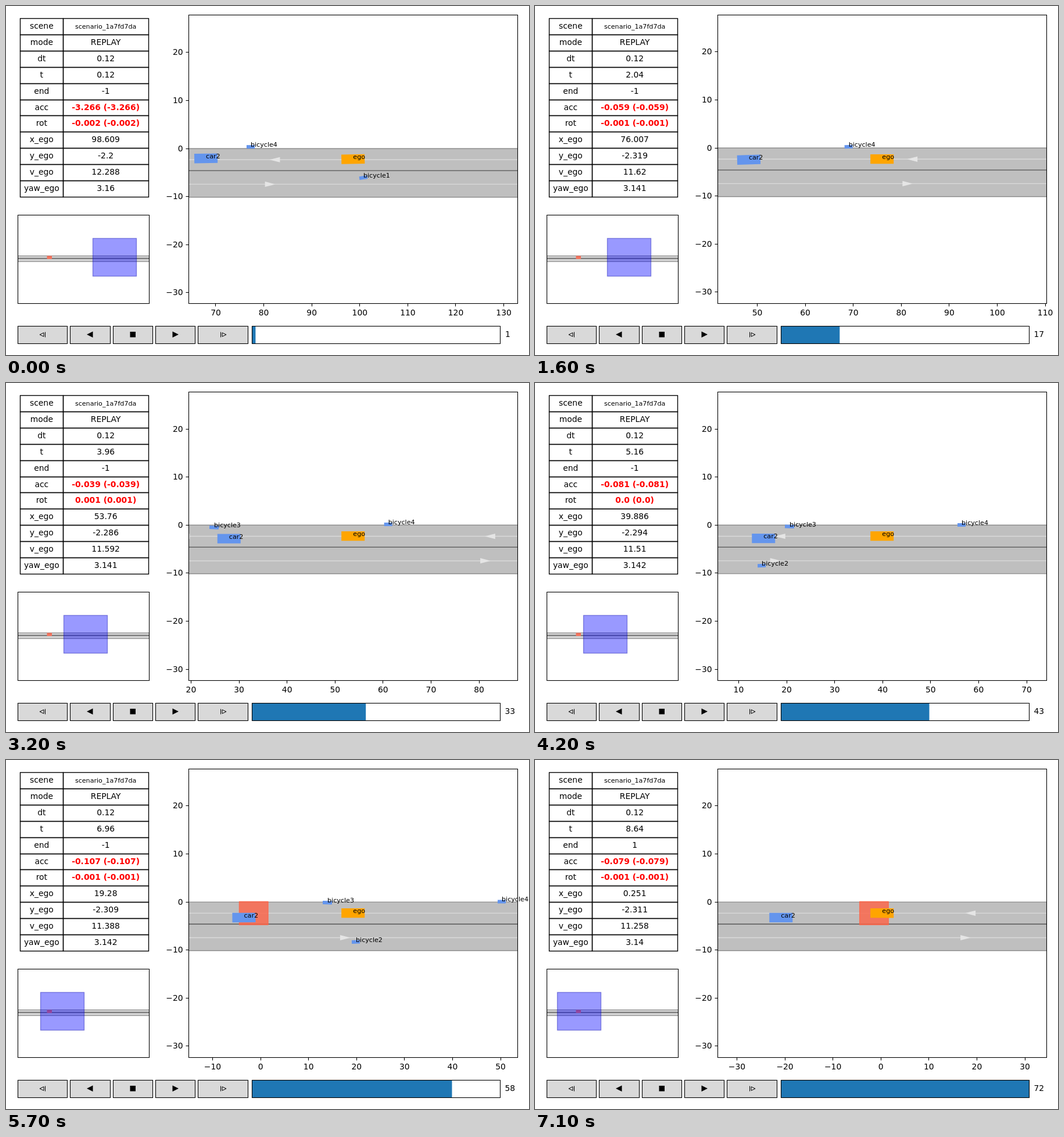
These frames come from a looping animation (900x600 px, 7200 ms). An HTML page with a canvas:

```html
<!DOCTYPE html>
<html lang="en">
<head>
<meta charset="utf-8">
<title>Driving replay</title>
<style>
html, body { margin: 0; width: 100%; height: 100%; overflow: hidden; background: #fff; }
canvas { display: block; }
</style>
</head>
<body>
<canvas id="stage" width="900" height="600"></canvas>
<script>
const ctx = document.getElementById('stage').getContext('2d');
const LOOP = 7200, STEP = 100;
const FONT = '"DejaVu Sans", sans-serif';
const VIEW = { left: 314.5, top: 15.5, right: 880.5, bottom: 511.5, cx: 597.3, cy: 263.2, scale: 8.26 };
const MARKS = [1, 10, 24, 33, 43, 58, 72];

// Monotone cubic through (ns, vs), continued in a straight line at both ends.
function track(vs, ns = MARKS, startSlope) {
  const last = ns.length - 1;
  const secant = ns.slice(1).map((n, i) => (vs[i + 1] - vs[i]) / (n - ns[i]));
  const slope = ns.map((_, i) => {
    if (i === 0) return startSlope ?? secant[0];
    if (i === last) return secant[last - 1];
    const a = secant[i - 1], b = secant[i];
    return a * b <= 0 ? 0 : 2 * a * b / (a + b);
  });
  return n => {
    if (n <= ns[0]) return vs[0] + slope[0] * (n - ns[0]);
    if (n >= ns[last]) return vs[last] + slope[last] * (n - ns[last]);
    let i = 0;
    while (n > ns[i + 1]) i++;
    const h = ns[i + 1] - ns[i], u = (n - ns[i]) / h, w = 1 - u;
    return w * w * ((1 + 2 * u) * vs[i] + u * h * slope[i])
      + u * u * ((3 - 2 * u) * vs[i + 1] - w * h * slope[i + 1]);
  };
}

const ego = {
  x: track([98.609, 85.787, 66.284, 53.76, 39.886, 19.28, 0.251], MARKS, -1.47),
  y: track([-2.2, -2.335, -2.297, -2.286, -2.294, -2.309, -2.311]),
  yaw: track([3.16, 3.143, 3.14, 3.141, 3.142, 3.142, 3.14]),
  rot: track([-0.002, -0.003, 0.001, 0.001, 0, -0.001, -0.001]),
  acc: track([-0.155, -0.155, 0.037, -0.039, -0.081, -0.107, -0.079]),
  v: track([11.69, 11.664, 11.589, 11.592, 11.51, 11.388, 11.258])
};
// Initial braking, which fades within the first steps.
const braking = (n, amount, fade) => n < 10 ? amount * Math.exp((1 - n) / fade) : 0;

const others = [
  { name: 'car2', w: 40, h: 16.3, from: 1, to: 72,
    x: track([67.95, 56.82, 39.55, 27.91, 15.18, -3.46, -20.82]),
    y: track([-2.05, -2.22, -2.67, -2.83, -2.76, -3.25, -3.25]) },
  { name: 'bicycle1', w: 14, h: 6, from: 1, to: 5,
    x: track([100.75, 105.2], [1, 10]), y: track([-6.05, -5.35], [1, 10]) },
  { name: 'bicycle2', w: 14, h: 6, from: 34, to: 64,
    x: track([14.8, 19.85], [43, 58]), y: track([-8.44, -8.31], [43, 58]) },
  { name: 'bicycle3', w: 16, h: 6, from: 25, to: 64,
    x: track([24.79, 20.6, 13.92], [33, 43, 58]), y: track([-0.5, -0.3, -0.14], [33, 43, 58]) },
  { name: 'bicycle4', w: 14, h: 6, from: 1, to: 65,
    x: track([77.26, 72.67, 65.43, 61.07, 56.44, 50.24], MARKS.slice(0, 6)),
    y: track([0.35, 0.35, 0.15, 0.16, 0.04, 0.08], MARKS.slice(0, 6)) }
];

function text(str, x, y, { size = 13.89, align = 'center', color = '#000', weight = '' } = {}) {
  ctx.font = `${weight} ${size}px ${FONT}`;
  ctx.textAlign = align;
  ctx.fillStyle = color;
  ctx.fillText(str, x, y);
}

function line(x1, y1, x2, y2, color = '#000', width = 1.1) {
  ctx.strokeStyle = color;
  ctx.lineWidth = width;
  ctx.beginPath();
  ctx.moveTo(x1, y1);
  ctx.lineTo(x2, y2);
  ctx.stroke();
}

function box(x1, y1, x2, y2, fill, stroke = '#000', width = 1.1) {
  if (fill) {
    ctx.fillStyle = fill;
    ctx.fillRect(x1, y1, x2 - x1, y2 - y1);
  }
  if (stroke) {
    ctx.strokeStyle = stroke;
    ctx.lineWidth = width;
    ctx.strokeRect(x1, y1, x2 - x1, y2 - y1);
  }
}

function triangle(tipX, baseX, y, half, fill, stroke) {
  ctx.beginPath();
  ctx.moveTo(tipX, y);
  ctx.lineTo(baseX, y - half);
  ctx.lineTo(baseX, y + half);
  ctx.closePath();
  if (fill) {
    ctx.fillStyle = fill;
    ctx.fill();
  }
  if (stroke) {
    ctx.strokeStyle = stroke;
    ctx.lineWidth = 1;
    ctx.stroke();
  }
}

function clipped(x1, y1, x2, y2, draw) {
  ctx.save();
  ctx.beginPath();
  ctx.rect(x1, y1, x2 - x1, y2 - y1);
  ctx.clip();
  draw();
  ctx.restore();
}

function decimal(value, digits = 3) {
  const rounded = +value.toFixed(digits) || 0;
  return Number.isInteger(rounded) ? rounded + '.0' : String(rounded);
}

const twice = value => `${decimal(value)} (${decimal(value)})`;

function drawTable(n, s) {
  const rows = [
    ['scene', 'scenario_1a7fd7da'],
    ['mode', 'REPLAY'],
    ['dt', '0.12'],
    ['t', decimal(n * 0.12, 2)],
    ['end', n === 72 ? '1' : '-1'],
    ['acc', twice(s.acc)],
    ['rot', twice(s.rot)],
    ['x_ego', decimal(s.x)],
    ['y_ego', decimal(s.y)],
    ['v_ego', decimal(s.v)],
    ['yaw_ego', decimal(s.yaw)]
  ];
  const top = 21.4, height = 27.92;
  rows.forEach(([key, value], i) => {
    const y1 = Math.round(top + i * height - 0.5) + 0.5;
    const y2 = Math.round(top + (i + 1) * height - 0.5) + 0.5;
    const base = Math.round(top + (i + 0.5) * height + 3.6);
    box(24.5, y1, 98.5, y2, null, '#000', 1.39);
    box(98.5, y1, 245.5, y2, null, '#000', 1.39);
    text(key, 61.3, base);
    const style = i === 0 ? { size: 11.11 }
      : i === 5 || i === 6 ? { color: '#f00', weight: 'bold' } : {};
    text(value, 171.6, base, style);
  });
}

function drawMinimap(s) {
  clipped(20.5, 359.5, 246.5, 511.5, () => {
    box(20, 429.5, 247, 439.5, '#d0d0d0', null);
    line(20, 429.5, 247, 429.5, '#858585', 1.2);
    line(20, 439.5, 247, 439.5, '#858585', 1.2);
    line(20, 434, 247, 434, '#5c5c5c', 1.4);
    box(70.5, 429.5, 79, 435, 'rgb(242,115,93)', null);
    const cx = Math.round(75.6 + 1.133 * s.x);
    box(cx - 37.5, 399.5, cx + 37.5, 464.5, 'rgba(0,0,255,0.4)', 'rgba(0,0,170,0.4)', 1.39);
  });
  box(20.5, 359.5, 246.5, 511.5);
}

function drawRoad(px, py) {
  const { left, right } = VIEW;
  const edge = 'rgba(90,90,90,0.6)';
  box(left, py(0), right, py(-10.13), '#bfbfbf', null);
  line(left, py(0), right, py(0), edge, 1.39);
  line(left, py(-10.13), right, py(-10.13), edge, 1.39);
  line(left, py(-4.6), right, py(-4.6), '#646464', 1.6);
  line(left, py(-2.33), right, py(-2.33), '#dadada', 1.39);
  line(left, py(-7.43), right, py(-7.43), '#dadada', 1.39);
  for (const [leftTip, rightTip] of [[81.2, 82.4], [17.55, 18.72]]) {
    triangle(px(leftTip), px(leftTip + 2.17), py(-2.33), 4.6, '#e5e5e5');
    triangle(px(rightTip), px(rightTip - 2.15), py(-7.43), 4.6, '#e5e5e5');
  }
  ctx.lineJoin = 'round';
  box(px(-4.43), py(0.07), px(1.57), py(-4.73), 'rgba(255,99,71,0.8)', 'rgba(255,99,71,0.8)', 1.39);
  ctx.lineJoin = 'miter';
}

function drawBody(x, y, w, h, angle, color) {
  ctx.save();
  ctx.translate(x, y);
  ctx.rotate(angle);
  ctx.fillStyle = color;
  ctx.fillRect(-w / 2, -h / 2, w, h);
  ctx.restore();
}

function drawTicks(s, px, py) {
  const { left, right, bottom, top } = VIEW;
  const label = v => (v < 0 ? '\u2212' : '') + Math.abs(v);
  for (let v = Math.ceil((s.x - 40) / 10) * 10; v < s.x + 40; v += 10) {
    const x = px(v);
    if (x < left - 0.5 || x > right + 0.5) continue;
    const snapped = Math.floor(x) + 0.5;
    line(snapped, bottom, snapped, bottom + 5);
    text(label(v), x, 532);
  }
  for (let v = -30; v <= 20; v += 10) {
    const y = Math.floor(py(v)) + 0.5;
    if (y < top || y > bottom) continue;
    line(left, y, left - 5, y);
    text(label(v), 304.6, Math.round(y + 4.8), { align: 'right' });
  }
}

function drawScene(n, s) {
  const { left, top, right, bottom, cx, cy, scale } = VIEW;
  const px = x => cx + (x - s.x) * scale;
  const py = y => cy - (y - s.y) * scale;
  const visible = others
    .filter(o => n >= o.from && n <= o.to)
    .map(o => {
      const dx = o.x(n + 0.5) - o.x(n - 0.5), dy = o.y(n + 0.5) - o.y(n - 0.5);
      return { ...o, sx: px(o.x(n)), sy: py(o.y(n)), angle: -Math.atan(dy / dx) };
    })
    .filter(o => o.sx > left && o.sx < right);

  clipped(left, top, right, bottom, () => {
    drawRoad(px, py);
    for (const o of visible) drawBody(o.sx, o.sy, o.w, o.h, o.angle, '#6495ed');
    drawBody(cx - 0.1, cy, 40, 16.3, Math.PI - s.yaw, '#ffa500');
  });
  drawTicks(s, px, py);
  box(left, top, right, bottom);
  const small = { size: 11.11, align: 'left' };
  for (const o of visible) text(o.name, o.sx, Math.round(o.sy), small);
  text('ego', cx, Math.round(cy), small);
}

function drawControls(n) {
  const buttons = [[20.5, 105.5], [110.5, 179.5], [184.5, 252.5], [257.5, 325.5], [330.5, 416.5]];
  for (const [x1, x2] of buttons) box(x1, 550.5, x2, 580.5, '#d9d9d9');
  triangle(58, 65, 565, 3.3, null, '#000');
  line(67.5, 560.5, 67.5, 569.5, '#000', 1);
  triangle(139, 149.5, 564.7, 5.2, '#000');
  box(213.5, 560, 223, 569.5, '#000', null);
  triangle(297, 286.5, 564.7, 5.2, '#000');
  line(369.5, 560.5, 369.5, 569.5, '#000', 1);
  triangle(379, 372, 565, 3.3, null, '#000');

  box(423.5, 550.5, 423.5 + 427 * n / 72, 580.5, '#1f77b4', null);
  box(423.5, 550.5, 850.5, 580.5);
  text(String(n), n < 10 ? 859 : 858.5, 569, { align: 'left' });
}

function draw() {
  const n = Math.floor(performance.now() % LOOP / STEP) + 1;
  const s = {
    x: ego.x(n), y: ego.y(n), yaw: ego.yaw(n), rot: ego.rot(n),
    acc: ego.acc(n) + braking(n, -3.111, 1.5),
    v: ego.v(n) + braking(n, 0.598, 2.5)
  };
  ctx.fillStyle = '#fff';
  ctx.fillRect(0, 0, 900, 600);
  drawTable(n, s);
  drawMinimap(s);
  drawScene(n, s);
  drawControls(n);
  requestAnimationFrame(draw);
}
draw();
</script>
</body>
</html>
```
